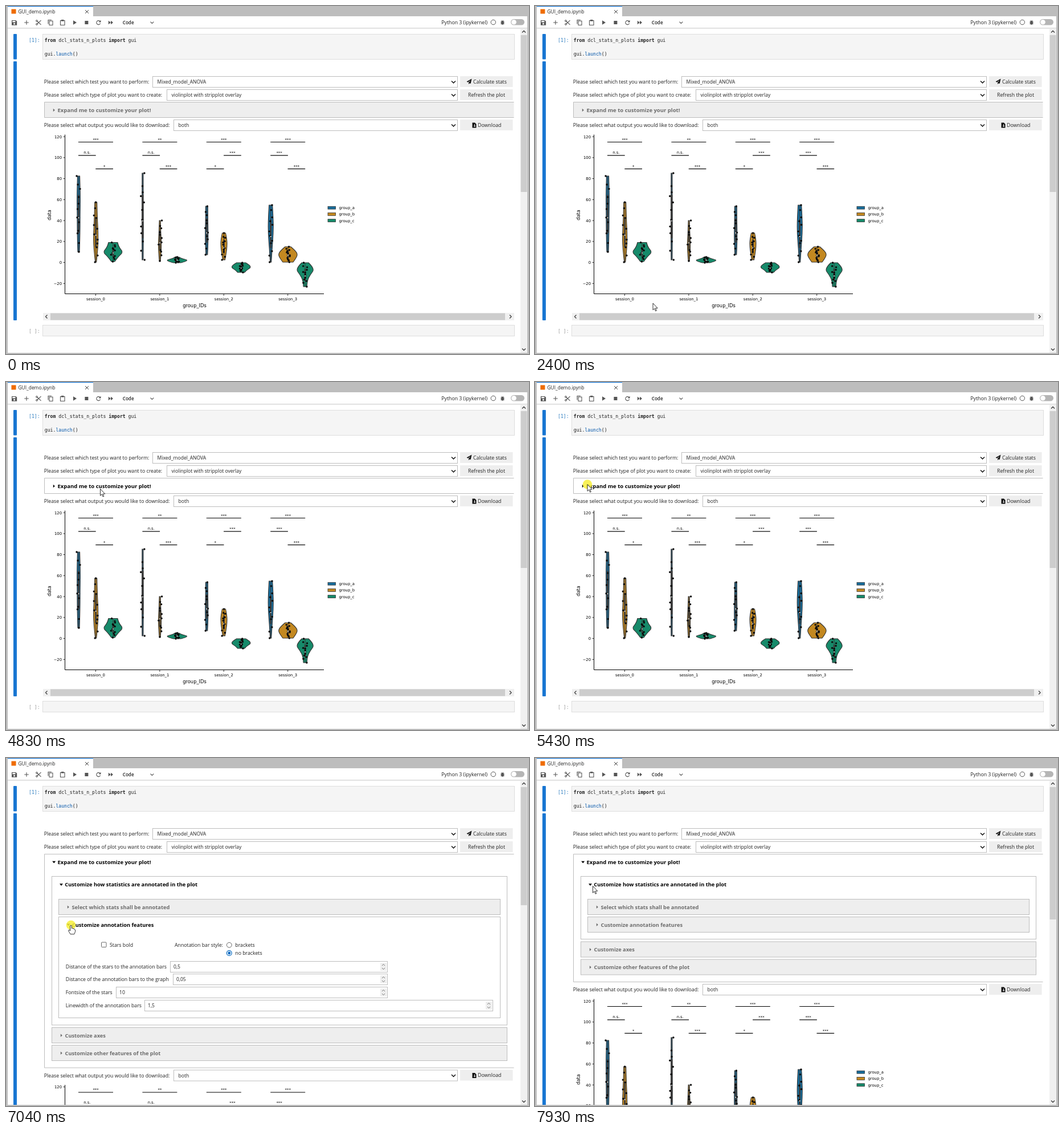
An HTML page that plays this animation: 918 px wide and 610 px high, repeating every 8000 ms.

```html
<!DOCTYPE html>
<html lang="en">
<head>
<meta charset="utf-8">
<title>Notebook plot GUI</title>
<style>
html, body { margin: 0; width: 100%; height: 100%; overflow: hidden; background: #fff; }
svg { display: block; width: 918px; height: 610px; }
text { font: 8.75px "Open Sans", "Noto Sans", sans-serif; fill: #222; white-space: pre; }
.v { font-size: 8.55px; }
.h { font-weight: 700; font-size: 9.25px; fill: #000; }
.off { fill: #6c6c6c; }
.m { font: 8.15px "DejaVu Sans Mono", monospace; }
.p { font: 6.8px "DejaVu Sans", sans-serif; fill: #000; }
.ax { font-size: 8.3px; }
.mid { text-anchor: middle; }
.end { text-anchor: end; }
</style>
</head>
<body>
<svg id="stage" viewBox="0 0 918 610" xmlns="http://www.w3.org/2000/svg"></svg>
<script>
const GREY = '#bdbdbd', INK = '#555', LOOP = 8000;

const rect = (x, y, w, h, fill, more = '') =>
  `<rect x="${x}" y="${y}" width="${w}" height="${h}" fill="${fill}" ${more}/>`;
const box = (x1, y1, x2, y2, fill = '#fff', line = GREY) =>
  rect(x1 + .5, y1 + .5, x2 - x1 - 1, y2 - y1 - 1, fill, `stroke="${line}"`);
const text = (x, y, s, cls = '', more = '') => `<text x="${x}" y="${y}" class="${cls}" ${more}>${s}</text>`;
const path = (d, fill = 'none', stroke = 'none', w = 1, more = '') =>
  `<path d="${d}" fill="${fill}" stroke="${stroke}" stroke-width="${w}" ${more}/>`;
const dot = (x, y, r, fill, more = '') => `<circle cx="${x}" cy="${y}" r="${r}" fill="${fill}" ${more}/>`;
const group = (id, s) => `<g id="${id}">${s}</g>`;

// ---- window, toolbar, code cell
function toolbar() {
  const line = d => path(d, 'none', INK, 1.1);
  const solid = d => path(d, INK);
  const ring = (x, y, r) => dot(x, y, r, 'none', `stroke="${INK}"`);
  return rect(0, 0, 918, 18, GREY) + rect(3, 0, 150, 19, '#fff') + rect(3, 0, 150, 1.2, '#1976d2') +
    rect(9.5, 5.5, 8, 8, '#ef6c00') + text(21.5, 13, 'GUI_demo.ipynb', '', 'style="font-size:8.4px"') +
    path('M139 7l6 6m0-6l-6 6', 'none', '#444') +
    rect(3, 18, 912, 21, '#fff') + rect(3, 38.4, 912, 1, '#c4c4c4') +
    path('M10 25h7.2l2 2v6.8h-9.2zM11.3 26v2.6h5.2v-2.6zM14.6 29.8a1.5 1.5 0 1 0 .01 0', INK, 'none', 1, 'fill-rule="evenodd"') +
    line('M36 25.2v7.6M32.2 29h7.6') +
    line('M54.5 26.5l7 6.3M54.5 31.5l7-6.3') + ring(54, 26, 1.4) + ring(54, 32, 1.4) +
    line('M74 31.5v-7h6M76 26.2h6v7.3h-6z') +
    line('M95.5 25.5h7.5v8h-7.5z') + rect(97, 24, 4.5, 2.6, INK) +
    solid('M118 25.2l6 3.8-6 3.8z') + rect(138.4, 26, 6, 6, INK) +
    line('M165.3 27.2a3.5 3.5 0 1 0 .3 3.2') + solid('M166.5 24.8v3.7h-3.7z') +
    solid('M179.8 25.8l4 3.2-4 3.2zM184 25.8l4 3.2-4 3.2z') +
    text(204.8, 32, 'Code', '', 'style="font-weight:600;font-size:8.1px"') +
    line('M253.5 27.6l2.9 2.9 2.9-2.9') +
    text(845, 32, 'Python 3 (ipykernel)', 'end') + ring(855.3, 28.5, 4.2) +
    `<ellipse cx="871.5" cy="29.3" rx="2.4" ry="3.5" fill="${INK}"/>` +
    path('M868.2 27.2h6.6M867.8 29.3h7.4M868.2 31.4h6.6M869.6 24.8l1 1.4m2.8-1.4l-1 1.4', 'none', INK, .7) +
    rect(886, 23, 24, 10.5, '#b5b5b5', 'rx="5.2"') + dot(891.5, 28.2, 4.3, '#fff');
}

function codeCell() {
  const bold = s => `<tspan font-weight="700">${s}</tspan>`;
  return rect(13, 49, 6, 44.5, '#1976d2', 'rx="1"') + text(40, 63, '[1]:', 'm', 'style="fill:#307fc1"') +
    box(64, 49, 893, 94, '#f5f5f5', '#dedede') +
    text(67.8, 63, bold('from') + ' dcl_stats_n_plots ' + bold('import') + ' gui', 'm') +
    text(67.8, 87, 'gui.<tspan style="fill:#0055aa">launch</tspan>()', 'm');
}

// ---- form widgets
const select = (label, x, y, value) => text(66.8, y + 13.3, label) + box(x, y, 793, y + 20) +
  text(x + 8.5, y + 13.3, value, 'v') +
  path(`M782 ${y + 8.5}l3.5 3.5 3.5-3.5`, 'none', '#111', 1.5);
const button = (x, y, label) => rect(797, y, 92.5, 19, '#eee') + text(x, y + 12.8, label);
const arrow = (x, y, open, fill) =>
  path(open ? `M${x - .8} ${y - 1.7}h6l-3 3.6z` : `M${x + .8} ${y - 2.7}l3 2.7-3 2.7z`, fill);
const title = (x, y, s, open, lit = open, size = 9.25) => arrow(x, y, open, lit ? '#000' : '#6c6c6c') +
  text(x + 8.5, y + 3.2, s, lit ? 'h' : 'h off', `style="font-size:${size}px"`);
const fold = (x1, y, x2, s, lit) => box(x1, y, x2, y + 28, lit ? '#fff' : '#eee') + title(x1 + 15, y + 14.3, s, false, lit);
const number = (label, x1, y, x2, value) => text(104.8, y + 13, label) + box(x1, y, x2, y + 20) +
  text(x1 + 6, y + 13, value, 'v') + rect(x2 - 13, y + 3, 11, 14, '#eee') +
  path(`M${x2 - 10} ${y + 8}l2.5-2.5 2.5 2.5m0 4l-2.5 2.5-2.5-2.5`, 'none', '#666', .9);

const outer = (bottom, open, lit) => path(`M891.5 168.5H67.5V${bottom}H891.5`, lit ? '#fff' : '#eee', GREY) +
  title(82, 182.5, 'Expand me to customize your plot!', open, lit, 9.5);

function panel(full, lit) {
  const d = full ? 0 : -150.5;
  let s = outer(543 + d, true, true) + box(80, 207, 880, 468.5 + d) +
    title(94.8, 222, 'Customize how statistics are annotated in the plot', true) +
    fold(92, 247, 868, 'Select which stats shall be annotated');
  if (full) {
    s += box(92, 278, 868, 456) + title(107.3, 292.3, 'Customize annotation features', true) +
      rect(167.5, 323, 8.5, 8.5, '#fff', 'stroke="#666" rx="1"') + text(182, 331, 'Stars bold') +
      text(296, 331, 'Annotation bar style:') + text(402.3, 331, 'brackets') + text(402.3, 345, 'no brackets') +
      dot(391.8, 327.8, 4.4, '#fff', 'stroke="#666"') +
      dot(391.8, 342, 4.4, '#fff', 'stroke="#0067c0" stroke-width="1.2"') + dot(391.8, 342, 2.4, '#0067c0') +
      number('Distance of the stars to the annotation bars', 288, 356, 670, '0,5') +
      number('Distance of the annotation bars to the graph', 293, 378, 670, '0,05') +
      number('Fontsize of the stars', 193, 401, 670, '10') +
      number('Linewidth of the annotation bars', 243, 424, 855, '1,5');
  } else s += fold(92, 278, 868, 'Customize annotation features', lit);
  return s + fold(80, 472 + d, 880, 'Customize axes') + fold(80, 503 + d, 880, 'Customize other features of the plot');
}

// ---- plot
const HUES = ['#176d9c', '#c38820', '#168a6a'];
let seed = 11;
const rnd = () => (seed = seed * 16807 % 2147483647) / 2147483647;

// top, bottom and half widths from top to bottom; three per session
const VIOLINS = [
  [298, 431, 2, 3, 2.5, 2.5, 1.5], [344, 449, 2, 2.5, 4, 4, 1], [414.5, 448, 8, 10, 18, 9, 3],
  [293, 445, 1, 1, 1.3, 1.3, 1], [376, 447, 1, 1.5, 2.5, 2.5, 1], [440, 450, 3, 7, 18, 16, 7],
  [351, 436, 2, 2, 2.5, 2.5, 1.5], [398, 445, 3, 5.5, 5.5, 4, 2], [450, 467, 8, 15, 17, 10, 6],
  [349, 449, 3, 4.5, 4.5, 2.5, 1], [422, 449, 5, 13, 17, 14, 9], [450, 492, 6, 17, 9, 3.5, 3]];

function violin([top, bot, ...w], i) {
  const x = 127.5 + (i / 3 | 0) * 112.4 + i % 3 * 30.2, h = bot - top;
  const pts = w.map((v, k) => [v, top + h * k / (w.length - 1)]);
  const side = (list, sign) => list.slice(1, -1).map(([v, y], k) => {
    const n = list[k + 2], last = k === list.length - 3;
    const e = last ? n : [(v + n[0]) / 2, (y + n[1]) / 2];
    return `Q${x + sign * v} ${y} ${x + sign * e[0]} ${e[1]}`;
  }).join('');
  const back = [...pts].reverse();
  let s = path(`M${x + w[0]} ${top}${side(pts, 1)}H${x - back[0][0]}${side(back, -1)}Z`, HUES[i % 3], '#333', 1.1) +
    path(`M${x} ${top}V${bot}`, 'none', '#3a3a3a', 1) +
    path(`M${x} ${top + h * .25}V${top + h * .75}`, 'none', '#3a3a3a', 2.8);
  const n = 12;
  for (let k = 0; k < n; k++) {
    const u = k === 0 ? 0 : k === n - 1 ? 1 : (k + rnd() * .8) / n;
    s += dot((x + (rnd() - .5) * 7).toFixed(1), (top + h * u).toFixed(1), 1.7, '#0a0a0a');
  }
  return s + dot(x, top + h * .55, .9, '#fff');
}

function plot() {
  let s = path('M103.5 225.5V504.5H558', 'none', '#000');
  for (let v = -20; v <= 120; v += 20) {
    const y = 449.6 - 1.838 * v;
    s += path(`M100.5 ${y}h3`, 'none', '#000', .8) + text(98, y + 2.5, String(v).replace('-', '−'), 'p end');
  }
  // per session: top label, then start slot and label of the two lower bars
  const marks = [['***', 0, 'n.s.', 1, '*'], ['**', 0, 'n.s.', 1, '***'],
    ['***', 1, '***', 0, '*'], ['***', 0, '***', 1, '***']];
  marks.forEach(([all, p, a, q, b], i) => {
    const x = 127 + i * 112.4;
    const bar = (from, w, y, label) => path(`M${x + from} ${y}h${w}`, 'none', '#000', 1.2) +
      text(x + from + w / 2, y - (label[0] === 'n' ? 3 : 2), label, 'p mid');
    s += bar(0, 61, 238.5, all) + bar(p * 30.3, 30.7, 261.9, a) + bar(q * 30.3, 30.7, 285.5, b) +
      path(`M${x + 30.5} 505v3`, 'none', '#000', .8) + text(x + 30.5, 516, 'session_' + i, 'p mid');
  });
  s += VIOLINS.map(violin).join('') + text(331, 527.5, 'group_IDs', 'p ax mid') +
    text(0, 0, 'data', 'p ax mid', 'transform="translate(78.5 366.5) rotate(-90)"');
  ['group_a', 'group_b', 'group_c'].forEach((g, i) => {
    const y = 353.7 + i * 11.2;
    s += rect(565, y - 2.4, 13.5, 4.8, HUES[i], 'stroke="#333" stroke-width=".8"') + text(584.5, y + 2.5, g, 'p');
  });
  return s;
}

// everything below the customizing panel
const lower = () => select('Please select what output you would like to download:', 294, 199, 'both') +
  button(828, 199, 'Download') +
  path('M818.5 204.5h4.5l2.5 2.5v6.5h-7zM822 207v3h-1.5l2 2 2-2h-1.5v-3z', '#111', 'none', 1, 'fill-rule="evenodd"') +
  plot() + rect(65, 538, 827, 13, '#f0f0f0') + rect(78, 538.5, 798, 12, '#cdcdcd') +
  path('M72.5 541.5l-3 3 3 3M884 541.5l3 3-3 3', 'none', '#444', 1.4) +
  text(40, 572.5, '[ ]:', 'm', 'style="fill:#9a9a9a"') + box(64, 559, 893, 579, '#f5f5f5', '#dedede');

const ARROW = 'M0 0V11.8L2.7 9.3 4.6 13.7 6.3 13 4.5 8.7H8.2Z';
const HAND = 'M-1.3 1Q0-.8 1.3 1V5.5Q3 4.5 3.5 6 5.5 5.5 5.7 7 7.5 7.3 7.5 9V11.5L5.8 15.8H-1L-4.3 10Q-4.5 8-2.7 8.5L-1.3 10Z';

const stage = document.getElementById('stage');
stage.innerHTML = rect(0, 0, 918, 610, '#fff') + codeCell() +
  rect(13, 97, 6, 454, '#1976d2', 'id="strip" rx="1"') +
  select('Please select which test you want to perform:', 257, 123, 'Mixed_model_ANOVA') +
  button(820, 123, 'Calculate stats') +
  path('M817.5 127.5l-9 5 2.5 1.2 4.5-4-3.5 4.7v2.8l1.6-1.9 2 .9z', '#111') +
  select('Please select which type of plot you want to create:', 282, 146, 'violinplot with stripplot overlay') +
  button(811, 146, 'Refresh the plot') +
  group('closed', outer(195.5, false, false)) + group('closedLit', outer(195.5, false, true)) +
  group('full', panel(true)) + group('shortLit', panel(false, true)) + group('short', panel(false, false)) +
  group('lower', lower()) + toolbar() +
  rect(903, 39.5, 12, 569, '#f0f0f0') + rect(903.5, 51, 11, 275, '#cdcdcd', 'id="thumb"') +
  path('M906 46.5l3-3 3 3M906 600.5l3 3 3-3', 'none', '#444', 1.5) +
  rect(0, 18, 3, 592, GREY) + rect(915, 18, 3, 592, GREY) + rect(0, 608, 918, 2, GREY) +
  dot(0, 0, 8.3, '#f7ee3c', 'id="halo" opacity=".85"') +
  group('arrow', path(ARROW, '#fff', '#000', .8)) + group('hand', path(HAND, '#fff', '#000', .8));

// ---- timing
const el = id => document.getElementById(id);
const scenes = [
  { at: 0, id: 'closed', shift: 0, thumb: 275 },
  { at: 4820, id: 'closedLit', shift: 0, thumb: 275 },
  { at: 5530, id: 'full', shift: 347.5, thumb: 207 },
  { at: 7140, id: 'shortLit', shift: 197, thumb: 232 },
  { at: 7730, id: 'short', shift: 197, thumb: 232 }];

// pointer moves: start, end, number of steps, control points
const moves = [
  [500, 800, 4, [82, 48], [750, 210], [515, 318]],
  [1090, 1800, 8, [495, 335], [330, 480], [183, 511]],
  [1900, 2100, 3, [178, 513], [163, 516]],
  [2400, 3110, 8, [207, 521], [260, 570], [330, 433], [396, 500]],
  [3230, 3420, 3, [420, 497], [479, 505]],
  [4130, 4320, 3, [476, 500], [298, 257]],
  [4620, 5020, 5, [270, 240], [150, 165], [92, 179.5]],
  [5930, 6530, 7, [93, 192], [96, 270], [114, 293]],
  [7730, 7930, 3, [111, 275], [101.5, 224.5]]];

function bezier(pts, u) {
  while (pts.length > 1)
    pts = pts.slice(1).map((p, i) => p.map((v, k) => pts[i][k] + (v - pts[i][k]) * u));
  return pts[0];
}

function pointer(t) {
  const move = moves.filter(m => m[0] <= t).pop();
  if (!move) return null;
  const [from, to, n, ...pts] = move;
  const step = Math.min(n - 1, Math.floor((t - from) / (to - from) * (n - 1) + .02));
  return bezier(pts, step / (n - 1));
}

const show = (id, on) => { el(id).style.display = on ? '' : 'none'; };
const within = (t, a, b) => t >= a && t < b;

function draw(t) {
  const now = scenes.filter(s => s.at <= t).pop();
  scenes.forEach(s => show(s.id, s === now));
  el('lower').setAttribute('transform', `translate(0 ${now.shift})`);
  el('strip').setAttribute('height', 454 + now.shift);
  el('thumb').setAttribute('height', now.thumb);

  const pos = pointer(t), hand = within(t, 6530, 7730);
  show('arrow', pos && !hand);
  show('hand', pos && hand);
  show('halo', within(t, 5240, 5530) || within(t, 6940, 7140));
  if (pos) for (const id of ['arrow', 'hand', 'halo'])
    el(id).setAttribute('transform', `translate(${pos[0]} ${pos[1]})`);
}

function tick() {
  draw(performance.now() % LOOP);
  requestAnimationFrame(tick);
}
tick();
</script>
</body>
</html>
```
